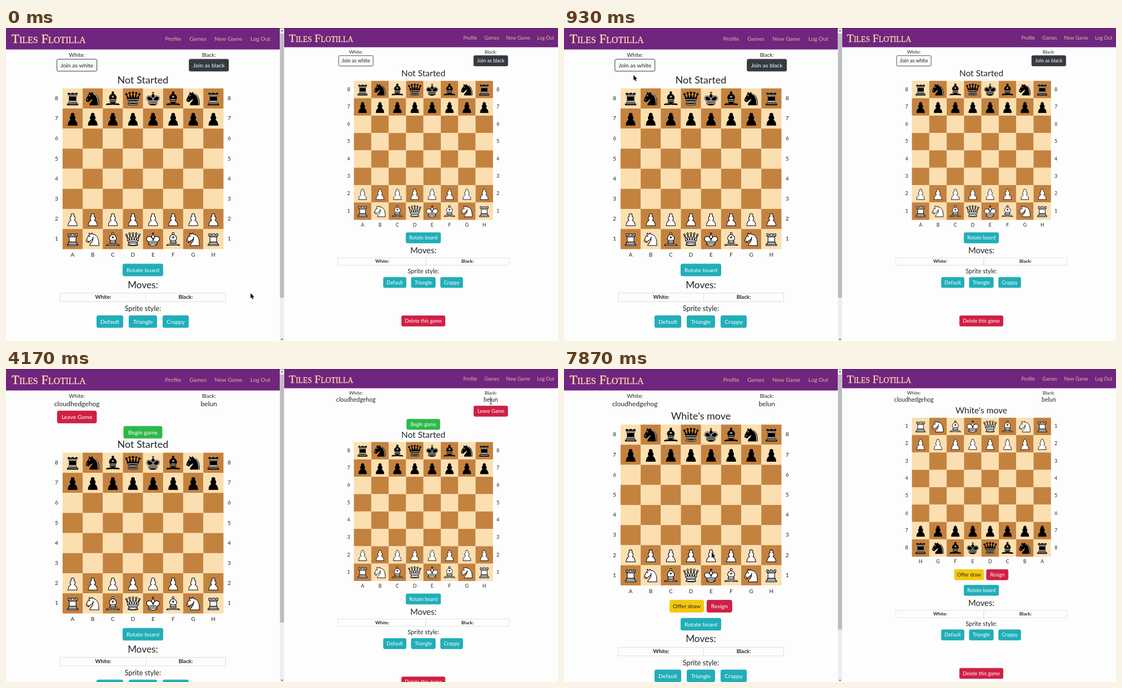
Recreate the animation shown at these times as an HTML page with a canvas. Size 994 by 564 pixels, loop 8000 ms.

```html
<!DOCTYPE html>
<html lang="en">
<head>
<meta charset="utf-8">
<title>Chess game</title>
<style>
  html, body { margin: 0; width: 994px; height: 564px; overflow: hidden; background: #fdfdfd; }
  canvas { display: block; }
</style>
</head>
<body>
<canvas id="stage" width="994" height="564"></canvas>
<script>
const ctx = document.getElementById('stage').getContext('2d');
const LOOP = 8000, CELL = 36.2, LEFT = -144.6, PIECE = 32;
const JOIN_WHITE = 1960, JOIN_BLACK = 3500, BEGIN = 5400;
const TEAL = '#20aeb8', RED = '#d01f45', GREEN = '#2db84b', DARK = '#343a40', INK = '#212529';
const PLAYERS = ['cloudhedgehog', 'belun'];

// Piece outlines on a 45 unit square: body, then detail lines.
const dot = (x, y, r) => `M${x - r} ${y}a${r} ${r} 0 1 1 ${2 * r} 0a${r} ${r} 0 1 1 ${-2 * r} 0z`;
const shapes = {
  p: ['M22.5 9c-2.2 0-4 1.8-4 4 0 .9.3 1.7.8 2.4C17.3 16.5 16 18.6 16 21c0 2 .9 3.8 2.4 5-3 1.1-7.4 5.6-7.4 13.5h23c0-7.9-4.4-12.4-7.4-13.5 1.5-1.2 2.4-3 2.4-5 0-2.4-1.3-4.5-3.3-5.6.5-.7.8-1.5.8-2.4 0-2.2-1.8-4-4-4z', ''],
  r: ['M9 39h27v-3h-3v-4l-2-2.5V17l3-3V9h-4v2h-5V9h-5v2h-5V9h-4v5l3 3v12.5L12 32v4H9z',
      'M12 36h21M12.5 32h20M14 29.5h17M14 17h17M11 14h23'],
  n: ['M22 10c10.5 1 16.5 8 16 29H15c0-9 10-6.5 8-21l1 0c.4 2.9-5.5 7.4-8 9-3 2-2.8 4.3-5 4-1-.9 1.4-3 0-3-1 0 .2 1.2-1 2-1 0-4 1-4-4 0-2 6-12 6-12s1.9-1.9 2-3.5c-.7-1-.5-2-.5-3 1-1 3 2.5 3 2.5h2s.8-2 2.5-3c1 0 1 3 1 3',
      dot(9, 25.5, .5) + dot(14.5, 15.5, .7)],
  b: ['M9 36c3.4-1 10.1.4 13.5-2 3.4 2.4 10.1 1 13.5 2 0 0 1.7.5 3 2-.7 1-1.7 1-3 .5-3.4-1-10.1.5-13.5-1-3.4 1.5-10.1 0-13.5 1-1.3.5-2.3.5-3-.5 1.3-1.5 3-2 3-2z' +
      'M15 32c2.5 2.5 12.5 2.5 15 0 .5-1.5 0-2 0-2 0-2.5-2.5-4-2.5-4 5.5-1.5 6-11.5-5-15.5-11 4-10.5 14-5 15.5 0 0-2.5 1.5-2.5 4 0 0-.5.5 0 2z' + dot(22.5, 8, 2.5),
      'M17.5 26h10M15 30h15M22.5 15.5v5M20 18h5'],
  q: ['M9 26L6.5 13.5 14 25l.3-14.1 5.2 13.6 3-14.5 3 14.5 5.2-13.6L31 25l7.5-11.5L36 26c0 2-1.5 2-2.5 4-1 1.5-1 1-.5 3.5 1.5 1 1 2.5 1 2.5 1.5 1.5 0 2.5 0 2.5-6.5 1-16.5 1-23 0 0 0-2-1-.5-2.5 0 0 0-1.5 1.5-2.5.5-2.5.5-2-.5-3.5-1-2-2.5-2-2.5-4z' +
      [[6, 12], [14, 9], [22.5, 8], [31, 9], [39, 12]].map(([x, y]) => dot(x, y, 2.2)).join(''),
      'M9 26c8.5-1.5 18.5-1.5 27 0M11.5 30c3.5-1 18.5-1 22 0M12 33.5c6-1 15-1 21 0M11 37c6 1 17 1 23 0'],
  k: ['M22.5 11.6V6M20 8h5M22.5 25s4.5-7.5 3-10.5c0 0-1-2.5-3-2.5s-3 2.5-3 2.5c-1.5 3 3 10.5 3 10.5' +
      'M11.5 37c5.5 3.5 15.5 3.5 21 0v-7s9-4.5 6-10.5c-4-6.5-13.5-3.5-16 4V27v-3.5c-3.5-7.5-13-10.5-16-4-3 6 5 10 5 10z',
      'M11.5 30c5.5-3 15.5-3 21 0M11.5 33.5c5.5-3 15.5-3 21 0M11.5 37c5.5-3 15.5-3 21 0'],
};
const pieces = {};
for (const key in shapes) pieces[key] = shapes[key].map(d => new Path2D(d));
const kingTrim = new Path2D('M32 29.5s8.5-4 6-9.7C34.2 14 25 18 22.5 24.5v2.1-2.1C20 18 10.9 14 7 19.8 4.5 25.5 13 29.5 13 29.5');
const knightTrim = new Path2D('M25 11.2c7 2 11.5 9 11.2 27.6');

const arrow = new Path2D('M0 0v10l2.3-2 1.7 3.6 1.7-.8L4 7.3h3z');
const hand = new Path2D('M-1 0q1-1 2 0v3l4 1q1 .4 1 2l-1 4h-5l-3-4q0-1.5 2-.5z');
const beam = new Path2D('M-2 0h4M-2 9h4M0 0v9');

function box(x, y, w, h, color) {
  ctx.fillStyle = color;
  ctx.fillRect(x, y, w, h);
}

// y is the middle of the capitals.
function text(str, x, y, size, color = INK, weight = 400) {
  ctx.font = `${weight} ${size}px Lato, sans-serif`;
  ctx.textAlign = 'center';
  ctx.fillStyle = color;
  ctx.fillText(str, x, y + size * .35);
}

function button(label, x, y, w, fill, color = '#fdfdfd', border = fill) {
  ctx.beginPath();
  ctx.roundRect(x - w / 2 + .5, y - 10.8, w - 1, 21.6, 2.5);
  ctx.fillStyle = fill;
  ctx.fill();
  ctx.strokeStyle = border;
  ctx.lineWidth = 1;
  ctx.stroke();
  text(label, x, y, 10.4, color);
}

function piece(kind, white, x, y) {
  const [body, lines] = pieces[kind], inset = (CELL - PIECE) / 2;
  ctx.save();
  ctx.translate(x + inset, y + inset);
  ctx.scale(PIECE / 45, PIECE / 45);
  ctx.lineWidth = 1.5;
  ctx.lineCap = ctx.lineJoin = 'round';
  ctx.fillStyle = white ? '#fff' : '#000';
  ctx.strokeStyle = '#000';
  ctx.fill(body);
  ctx.stroke(body);
  if (!white) ctx.strokeStyle = '#f4ead8';
  ctx.stroke(lines);
  if (!white && kind === 'k') ctx.stroke(kingTrim);
  if (!white && kind === 'n') ctx.stroke(knightTrim);
  ctx.restore();
}

function board(top, flipped) {
  for (let i = 0; i < 64; i++) {
    const row = i >> 3, col = i & 7;
    const x = LEFT + col * CELL, y = top + row * CELL;
    box(x, y, CELL + .1, CELL + .1, (row + col) % 2 ? '#c4823f' : '#fbdfb0');
    const r = flipped ? 7 - row : row, c = flipped ? 7 - col : col;
    if (r < 2 || r > 5) piece(r === 1 || r === 6 ? 'p' : 'rnbqkbnr'[c], r > 5, x, y);
  }
  for (let i = 0; i < 8; i++) {
    const mid = (i + .5) * CELL, n = flipped ? 7 - i : i;
    for (const x of [-155.5, 155.5]) text(8 - n, x, top + mid - .5, 10.3);
    text('ABCDEFGH'[n], LEFT + mid, top + 300, 10);
  }
}

// Horizontal positions count from the middle of the page.
function page({ x, y, scale, half, col, table, phase, top, me, flipped, hover }) {
  ctx.save();
  ctx.translate(x, y);
  ctx.scale(scale, scale);

  box(-half, -3, 2 * half, 41.7, '#70257f');
  ctx.font = 'small-caps 22.8px "Liberation Serif", serif';
  ctx.textAlign = 'left';
  ctx.fillStyle = ctx.strokeStyle = '#fde0ac';
  ctx.lineWidth = .3;
  ctx.fillText('Tiles Flotilla', 10 - half, 27);
  ctx.strokeText('Tiles Flotilla', 10 - half, 27);
  [['Profile', 192], ['Games', 147.5], ['New Game', 92.5], ['Log Out', 35]]
    .forEach(([label, dx]) => text(label, half - dx, 19, 10.2, '#deb795'));

  ['White', 'Black'].forEach((side, i) => {
    const cx = i ? col : -col;
    text(side + ':', cx, 48.5, 9.7);
    if (phase > i) {
      text(PLAYERS[i], cx, 63, 12.2);
      if (phase < 3 && me === i) button('Leave Game', cx, phase === 1 ? 95 : 86.5, 71.5, RED);
    } else if (i) {
      button('Join as black', cx, 67, 72, hover === 'black' ? '#23272b' : DARK);
    } else {
      button('Join as white', cx, 67, 73, hover === 'white' ? '#dae0e5' : '#f8f9fa', INK, DARK);
    }
  });

  if (phase === 2) button('Begin game', 0, top - 36.8, 70, hover === 'begin' ? '#249a3f' : GREEN);
  text(phase === 3 ? "White's move" : 'Not Started', 0, top - 15.3, 18);
  board(top, flipped);

  let base = top;
  if (phase === 3) {
    button('Offer draw', -25.5, top + 327.2, 62, '#f5c60e', INK);
    button('Resign', 33.3, top + 327.2, 46, RED);
    base += 32.5;
  }
  button('Rotate board', 0, base + 327.2, 73, TEAL);
  text('Moves:', 0, base + 353.7, 17.2);
  ctx.strokeStyle = '#dcdee0';
  ctx.lineWidth = 1;
  ctx.strokeRect(-table, base + 369, 2 * table, 15.2);
  ctx.strokeRect(5, base + 369, 0, 15.2);
  text('White:', -table * .48, base + 376, 9.6, INK, 700);
  text('Black:', table * .517, base + 376, 9.6, INK, 700);
  text('Sprite style:', 0, base + 396.7, 12.7);
  button('Default', -59.5, base + 420.2, 48, TEAL);
  button('Triangle', 0, base + 420.2, 51, TEAL);
  button('Crappy', 59, base + 420.2, 47, TEAL);
  button('Delete this game', 0, base + 500.4, 91.5, RED);
  ctx.restore();
  return base;
}

function triangle(x, y, dir) {
  ctx.beginPath();
  ctx.moveTo(x - 2, y);
  ctx.lineTo(x + 2, y);
  ctx.lineTo(x, y + 2.5 * dir);
  ctx.fillStyle = '#444';
  ctx.fill();
}

function scrollbar(base) {
  box(493, 0, 8, 564, '#eeeef3');
  box(493.5, 10, 7, 476 - (base - 108.8) * .69, '#bcbcbf');
  triangle(497, 6, -1);
  triangle(497, 560, 1);
}

// Pointer stops: time, x, y
const stops = [
  [0, 440.5, 478], [1070, 110, 66], [2060, 110, 66], [3000, 858.5, 123], [3300, 873, 55],
  [4250, 873, 55], [5000, 758, 102], [6750, 758, 102], [7600, 266, 331],
];

function pointerAt(t) {
  const next = stops.findIndex(s => s[0] > t);
  if (next < 0) return stops[stops.length - 1].slice(1);
  const [t0, x0, y0] = stops[next - 1], [t1, x1, y1] = stops[next];
  const k = (t - t0) / (t1 - t0), e = k * k * (3 - 2 * k);
  return [x0 + (x1 - x0) * e, y0 + (y1 - y0) * e];
}

function pointer([x, y], shape) {
  ctx.save();
  ctx.translate(x, y);
  ctx.scale(.9, .9);
  ctx.lineWidth = 1.2;
  if (shape === beam) {
    ctx.strokeStyle = '#333';
    ctx.stroke(beam);
  } else {
    ctx.strokeStyle = '#ddd';
    ctx.stroke(shape);
    ctx.fillStyle = '#000';
    ctx.fill(shape);
  }
  ctx.restore();
}

function draw(now) {
  const t = now % LOOP;
  const phase = (t >= JOIN_WHITE) + (t >= JOIN_BLACK) + (t >= BEGIN);
  const at = pointerAt(t);
  const over = (x, y, w, h) => Math.abs(at[0] - x) < w / 2 && Math.abs(at[1] - y) < h / 2;
  const hover = phase === 0 && over(127.5, 67, 73, 23) ? 'white'
    : phase === 1 && over(873, 59, 62, 20) ? 'black'
    : phase === 2 && over(751.5, 100, 61, 20) ? 'begin' : '';
  const onName = phase >= 2 && over(873, 56, 26, 12);

  box(0, 0, 994, 564, '#fdfdfd');
  page({
    x: 751.5, y: 1.2, scale: .8645, half: 289.8, col: 140.5, table: 178, phase, me: 1,
    top: [108.8, 108.8, 150.8, 100.2][phase], flipped: phase === 3, hover: hover === 'white' ? '' : hover,
  });
  const base = page({
    x: 246.5, y: 0, scale: 1, half: 246.5, col: 118.8, table: 149, phase, me: 0,
    top: [108.8, 131.8, 150.8, 100.2][phase], flipped: false, hover: hover === 'white' ? hover : '',
  });
  scrollbar(base);
  box(0, 0, 994, 1, 'rgba(30,20,40,.4)');
  pointer(at, hover ? hand : onName ? beam : arrow);
  requestAnimationFrame(draw);
}
requestAnimationFrame(draw);
</script>
</body>
</html>
```
